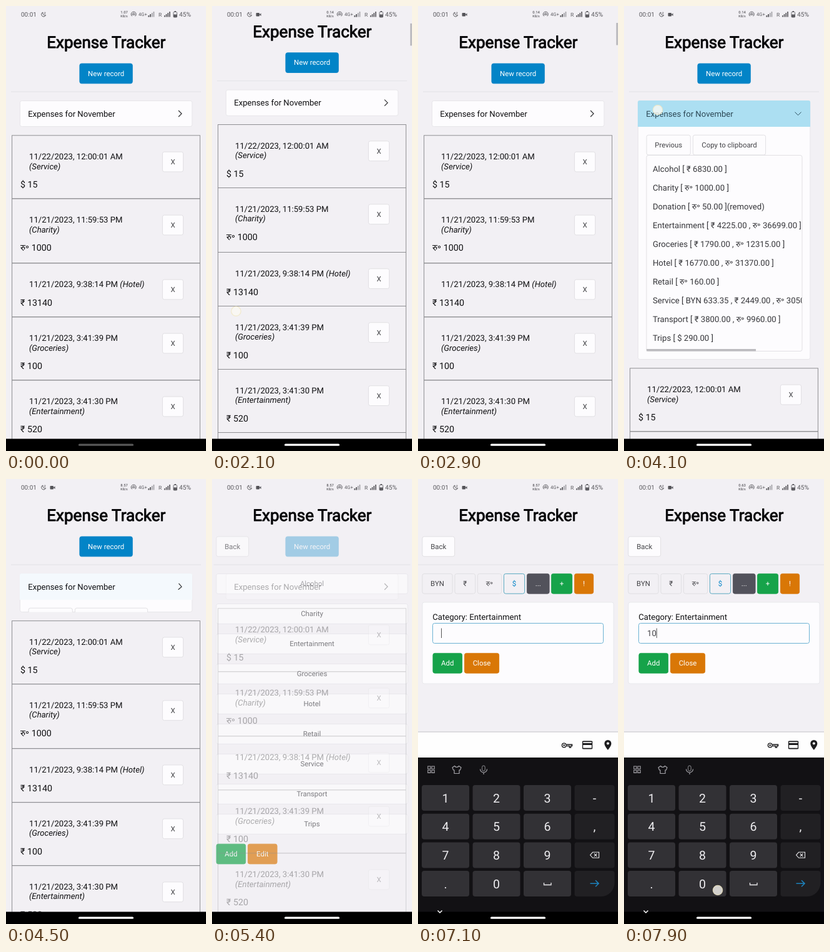
An HTML page with a canvas that plays this animation: 320 px wide and 711 px high, repeating every 8000 ms.

```html
<!DOCTYPE html>
<html lang="en">
<head>
<meta charset="utf-8">
<title>Expense Tracker</title>
<style>
html, body { margin: 0; width: 100%; height: 100%; overflow: hidden; background: #f2f0f4; }
canvas { display: block; width: 320px; height: 711px; }
</style>
</head>
<body>
<canvas id="stage"></canvas>
<script>
const dpr = window.devicePixelRatio || 1;

function surface(canvas) {
  canvas.width = 320 * dpr;
  canvas.height = 711 * dpr;
  const ctx = canvas.getContext('2d');
  ctx.scale(dpr, dpr);
  ctx.textRendering = 'geometricPrecision';
  return ctx;
}

const main = surface(document.getElementById('stage'));
const layer = surface(document.createElement('canvas'));
let c = main;

const LOOP = 8000;
const FONT = 'Roboto, "Noto Sans", "Noto Sans Devanagari", sans-serif';
const BG = '#f2f0f4', CARD = '#fdfcfe', EDGE = '#dddce0', INK = '#101012', GREY = '#444448';
const BLUE = '#0284c7', GREEN = '#16a34a', ORANGE = '#d97706';
const BODY = 13.15;

const RECORDS = [
  ['11/22/2023, 12:00:01 AM', 'Service', '$ 15', 101],
  ['11/21/2023, 11:59:53 PM', 'Charity', 'रु॰ 1000', 103],
  ['11/21/2023, 9:38:14 PM', 'Hotel', '₹ 13140', 86],
  ['11/21/2023, 3:41:39 PM', 'Groceries', '₹ 100', 101],
  ['11/21/2023, 3:41:30 PM', 'Entertainment', '₹ 520', 101],
  ['11/21/2023, 3:41:18 PM', 'Transport', '₹ 300', 101]
];
const TOTALS = [
  'Alcohol [ ₹ 6830.00 ]', 'Charity [ रु॰ 1000.00 ]', 'Donation [ रु॰ 50.00 ](removed)',
  'Entertainment [ ₹ 4225.00 , रु॰ 36699.00 ]', 'Groceries [ ₹ 1790.00 , रु॰ 12315.00 ]',
  'Hotel [ ₹ 16770.00 , रु॰ 31370.00 ]', 'Retail [ रु॰ 160.00 ]',
  'Service [ BYN 633.35 , ₹ 2449.00 , रु॰ 3050.00 ]',
  'Transport [ ₹ 3800.00 , रु॰ 9960.00 ]', 'Trips [ $ 290.00 ]'
];
const CATEGORIES = ['Alcohol', 'Charity', 'Entertainment', 'Groceries', 'Hotel',
  'Retail', 'Service', 'Transport', 'Trips'];

// start, end, x, y
const TAPS = [
  [3020, 3220, 56, 168], [3980, 4220, 54, 166], [4750, 4980, 160, 109],
  [5600, 5800, 150, 263], [6640, 6880, 58, 248], [7380, 7600, 57, 514], [7720, 8000, 150, 657]
];

const clamp = v => Math.max(0, Math.min(1, v));
const ramp = (t, a, b) => clamp((t - a) / (b - a));
const ease = k => k * k * (3 - 2 * k);
const mix = (a, b, k) =>
  `rgb(${a.map((v, i) => Math.round(v + (b[i] - v) * k)).join()})`;

function text(s, x, y, size, color = INK, align = 'left', style = '') {
  c.font = `${style} ${size}px ${FONT}`;
  c.textAlign = align;
  c.fillStyle = color;
  c.fillText(s, x, y);
}

function box(x, y, w, h, fill, stroke, r = 3) {
  c.beginPath();
  c.roundRect(x, y, w, h, r);
  if (fill) { c.fillStyle = fill; c.fill(); }
  if (stroke) { c.strokeStyle = stroke; c.lineWidth = 0.85; c.stroke(); }
}

function line(path, color, width = 1) {
  c.strokeStyle = color;
  c.lineWidth = width;
  c.stroke(new Path2D(path));
}

function disc(x, y, r, color) {
  c.fillStyle = color;
  c.beginPath();
  c.arc(x, y, r, 0, 7);
  c.fill();
}

function button(label, x, y, w, fill = CARD, color = GREY, edge = EDGE) {
  box(x + .4, y + .4, w - .8, 31.8, fill, edge);
  text(label, x + w / 2, y + 20.2, 11.4, color, 'center');
}
const solid = (label, x, y, w, fill) => button(label, x, y, w, fill, '#fff', fill);

function clip(x, y, w, h, draw) {
  c.save();
  c.beginPath();
  c.rect(x, y, w, h);
  c.clip();
  draw();
  c.restore();
}

function record([date, kind, amount, h], y) {
  c.strokeStyle = '#8f8f93';
  c.lineWidth = 1;
  c.strokeRect(9.6, y + .3, 300.8, h);
  text(date, 37, y + 38.5, BODY);
  const oneLine = h < 90, name = `(${kind})`;
  if (oneLine) text(name, 37 + c.measureText(date + ' ').width, y + 38.5, BODY, INK, 'left', 'italic');
  else text(name, 37, y + 54.1, BODY, INK, 'left', 'italic');
  text(amount, 23, y + (oneLine ? 68.5 : 83.5), 14.3);
  button('X', 250, y + 26.2, 34);
}

function summary(open) {
  const h = 42 + 372 * open;
  box(22.4, 151.4, 275.4, h - .8, CARD, '#e4e3e7');
  clip(22, 151, 276.2, h, () => {
    if (open) {
      box(22, 151, 276.2, 42, mix([253, 252, 254], [172, 223, 242], clamp(open * 2)), null, [3, 3, 0, 0]);
      button('Previous', 35.7, 205.8, 71);
      button('Copy to clipboard', 110, 205.8, 117);
      box(36, 238.5, 249, 313, CARD, EDGE);
      clip(36, 238, 248.5, 314, () => {
        TOTALS.forEach((s, i) => text(s, 46, 264.5 + 30 * i, BODY, '#36363a'));
      });
      box(36, 548, 175, 3.5, '#bdbcc0', null, 0);
    }
    text('Expenses for November', 35.2, 176.5, BODY, mix([16, 16, 18], [45, 72, 86], open));
    c.save();
    c.translate(278.5, 172);
    c.rotate(open * Math.PI / 2);
    line('M-2.5-5L2.5 0L-2.5 5', mix([45, 45, 48], [45, 80, 96], open), 1.2 - .2 * open);
    c.restore();
  });
}

function home(open) {
  solid('New record', 117.5, 91.6, 85.2, BLUE);
  summary(open);
  let y = 206.5 + 372 * open;
  for (const r of RECORDS) {
    record(r, y);
    y += r[3];
  }
}

function categories() {
  CATEGORIES.forEach((s, i) => {
    box(6.9, 151.4 + 48 * i, 306.2, 32, CARD, '#e2e1e5');
    text(s, 160, 171 + 48 * i, 11.4, GREY, 'center');
  });
  solid('Add', 6.7, 582.8, 47.5, GREEN);
  solid('Edit', 57, 582.8, 47.5, ORANGE);
}

function amountForm(t) {
  button('BYN', 6.5, 151, 49, BG);
  button('₹', 58.5, 151, 33.5, BG);
  button('रु॰', 95, 151, 39, BG);
  button('$', 137, 151, 34, BG, BLUE, '#3f9db8');
  solid('...', 174, 151, 36.5, '#52525b');
  solid('+', 213, 151, 34, GREEN);
  solid('!', 250, 151, 31, ORANGE);
  box(7, 197, 306, 130, CARD, '#e6e5e9');
  text('Category: Entertainment', 23.2, 225.3, BODY);
  const focus = ramp(t, 6650, 7000);
  box(23.5, 230.5, 273, 32, CARD, mix([216, 216, 220], [82, 166, 204], focus));
  const typed = t < 7500 ? '' : t < 7800 ? '1' : '10';
  text(typed, 37, 251, BODY, GREY);
  if (t > 6700) {
    c.fillStyle = '#555';
    c.fillRect(37 + c.measureText(typed).width, 238.5, 1, 15.5);
  }
  solid('Add', 23.5, 278, 47.5, GREEN);
  solid('Close', 74, 278, 56, ORANGE);
}

// Synthetic bold grows towards the upper right
function heading(scroll) {
  const x = 160.3, y = 67.2 - scroll;
  text('Expense Tracker', x, y, 26.07, '#08080a', 'center');
  c.strokeStyle = '#08080a';
  c.lineWidth = 0.9;
  c.lineJoin = 'round';
  c.strokeText('Expense Tracker', x, y);
  c.lineJoin = 'miter';
}

function signal(x, color) {
  for (let i = 0; i < 4; i++) {
    c.fillStyle = color;
    c.fillRect(x + i * 2.7, 15 - i * 2, 1.7, 2.5 + i * 2);
  }
}

function statusBar(t) {
  const ink = '#5c5b60';
  c.fillStyle = BG;
  c.fillRect(0, 0, 320, 26);
  text('00:01', 24, 17, 10, ink);
  line('M59 10A3.6 3.6 0 1 0 63.6 14.6A3.6 3.6 0 0 1 59 10', ink, 1);
  line('M61.3 10.2H63.2L61.3 12.4H63.2', ink, .7);
  if (t >= 100) {
    box(70.5, 11, 5.5, 5.5, '#555459', null, 1);
    c.fillStyle = '#555459';
    c.fill(new Path2D('M76 13.5L78.5 11.5V16L76 14Z'));
  }
  const speed = t < 1200 ? '1.07' : t < 4400 ? '0.14' : t < 7200 ? '8.57' : '0.63';
  text(speed, 189, 12, 5.8, ink, 'center', '500');
  text('KB/s', 189, 17.8, 5.2, ink, 'center', '500');
  line('M201.7 16.3A4 4 0 1 1 206.7 16.3M202.8 14.8A2 2 0 1 1 205.6 14.8', ink, 1);
  disc(204.2, 13.7, .9, ink);
  text('4G+', 212, 16, 7.6, ink);
  signal(227.5, '#a3a2a7');
  c.fillStyle = ink;
  c.fillRect(227.5, 15, 1.7, 2.5);
  c.fillRect(230.2, 13, 1.7, 4.5);
  text('R', 244, 17, 8.5, ink);
  signal(253, ink);
  box(268, 9.5, 5.5, 8.5, null, ink, 1);
  c.fillStyle = ink;
  c.fillRect(269.5, 8, 2.5, 1.5);
  c.fillRect(268, 13.5, 5.5, 4.5);
  text('45%', 277, 17, 10.2, ink);
}

function keyboard(k) {
  c.save();
  c.translate(0, (1 - k) * 307);
  c.fillStyle = '#dcdbdf';
  c.fillRect(0, 403, 320, 2);
  c.fillStyle = '#fefefe';
  c.fillRect(0, 405, 320, 40);
  c.fillStyle = '#121114';
  c.fillRect(0, 445, 320, 266);

  // autofill icons
  const ink = '#1c1c1e';
  line('M237.5 424.3H246.5V426.5H244.5V429H242.3V426.5H237.5', ink, 1.5);
  disc(233.7, 425.4, 4, ink);
  disc(233.7, 425.4, 2.6, '#fefefe');
  disc(233.7, 425.4, 1.3, ink);
  box(263.5, 419, 15, 12, null, ink, 1.5);
  line('M263.5 419.5H278.5V430.5H263.5Z', ink, 1.3);
  line('M263 423.5H279', ink, 3);
  c.fillStyle = ink;
  c.fill(new Path2D('M303.8 433C300 428 298.3 425.5 298.3 422.5A5.5 5.5 0 0 1 309.3 422.5C309.3 425.5 307.6 428 303.8 433Z'));
  disc(303.8, 422.5, 2, '#fefefe');

  // toolbar icons
  const tool = '#a5a4a9';
  for (let i = 0; i < 4; i++)
    line(`M${15.8 + i % 2 * 6.2} ${459 + (i >> 1) * 6.2}h4.2v4.2h-4.2z`, tool, 1.1);
  line('M58.5 458.5Q62 462.5 65.5 458.5L69 461L67.5 465H66V470.5H58V465H56.5L55 461Z', tool, 1.2);
  box(102.6, 458, 4.6, 8.5, null, tool, 2.3);
  line('M99.5 463.5A5.4 5.4 0 0 0 110.5 463.5M105 469V472', tool, 1.2);

  const keys = ['123-', '456,', '789', '.0'];
  const cols = [[6, 76], [87.5, 76], [169, 76], [250.5, 64]];
  keys.forEach((row, r) => cols.forEach(([x, w], i) => {
    const y = 489 + r * 45.7;
    const corner = r === 3 && i === 3 ? [4, 4, 22, 4] : 4;
    box(x, y, w, 41, i === 3 ? '#212023' : '#323135', null, corner);
    text(row[i] || '', x + w / 2, y + 27.5, 19.5, '#eeedf0', 'center');
  }));
  line('M275.5 600.8L279.5 596.3H289.5V605.3H279.5ZM281.8 598.5L286.4 603.1M286.4 598.5L281.8 603.1', '#e8e7ea', 1.1);
  line('M201.5 645V648.5H213V645', '#e8e7ea', 1.3);
  line('M275.5 646.3H289M284 641.3L289 646.3L284 651.3', '#1d82bd', 1.6);
  c.restore();
}

function navBar(t) {
  c.fillStyle = '#000';
  c.fillRect(0, 691.5, 320, 20);
  if (t > 6750) line('M31.5 689.5L35 693L38.5 689.5', '#fff', 1.5);
  const glow = ramp(t, 50, 700);
  box(116, 699.6, 88, 3.2, mix([88, 88, 88], [255, 255, 255], glow), null, 1.6);
}

function touch(x, y, alpha) {
  c.globalAlpha = alpha;
  disc(x, y, 7.7, 'rgba(250,249,243,.8)');
  c.strokeStyle = 'rgba(240,230,190,.75)';
  c.lineWidth = 1.2;
  c.stroke();
  c.globalAlpha = 1;
}

function scrollAt(t) {
  if (t < 2100) return 17 * ramp(t, 1930, 2100) ** 1.3;
  if (t < 2320) return 17 + 43 * Math.sin(ramp(t, 2100, 2320) * Math.PI / 2);
  return 60 * (1 - ease(ramp(t, 2360, 2720)));
}

// Fades a page as one group
function page(alpha, draw) {
  if (alpha <= 0) return;
  if (alpha === 1) return draw();
  c = layer;
  c.clearRect(0, 0, 320, 711);
  draw();
  c = main;
  c.globalAlpha = alpha;
  c.drawImage(layer.canvas, 0, 0, 320, 711);
  c.globalAlpha = 1;
}

function draw(t) {
  c.fillStyle = BG;
  c.fillRect(0, 0, 320, 711);

  const scroll = scrollAt(t);
  const toList = ramp(t, 5200, 5500), toForm = ramp(t, 5850, 6150);
  const open = ease(ramp(t, 3200, 3550)) - ease(ramp(t, 4200, 4550));

  heading(scroll);
  c.fillStyle = '#e4e3e7';
  const inset = 8 * (1 - toList);
  c.fillRect(inset, 136.5 - scroll, 320 - 2 * inset, 1);

  page(toList, () => button('Back', 6.5, 91.6, 52.5));
  page(toForm, () => amountForm(t));
  page(toList * (1 - toForm), categories);
  c.save();
  c.translate(0, -scroll);
  page(1 - toList, () => home(open));
  c.restore();

  const bar = ramp(t, 1930, 2000) * (1 - ramp(t, 2950, 3250));
  page(bar, () => box(317, 27 + scroll * .05, 3, 35.5, '#bebdc1', null, 0));

  statusBar(t);
  const rise = ease(ramp(t, 6800, 7080));
  if (rise) keyboard(rise);
  navBar(t);

  if (t > 1880 && t < 2720) touch(38.5, 505 - scroll, 1 - ramp(t, 2620, 2720));
  for (const [a, b, x, y] of TAPS)
    if (t >= a && t < b) touch(x, y, Math.min(ramp(t, a, a + 60), b === LOOP ? 1 : 1 - ramp(t, b - 60, b)));
}

function tick() {
  draw(performance.now() % LOOP);
  requestAnimationFrame(tick);
}
tick();
</script>
</body>
</html>
```
